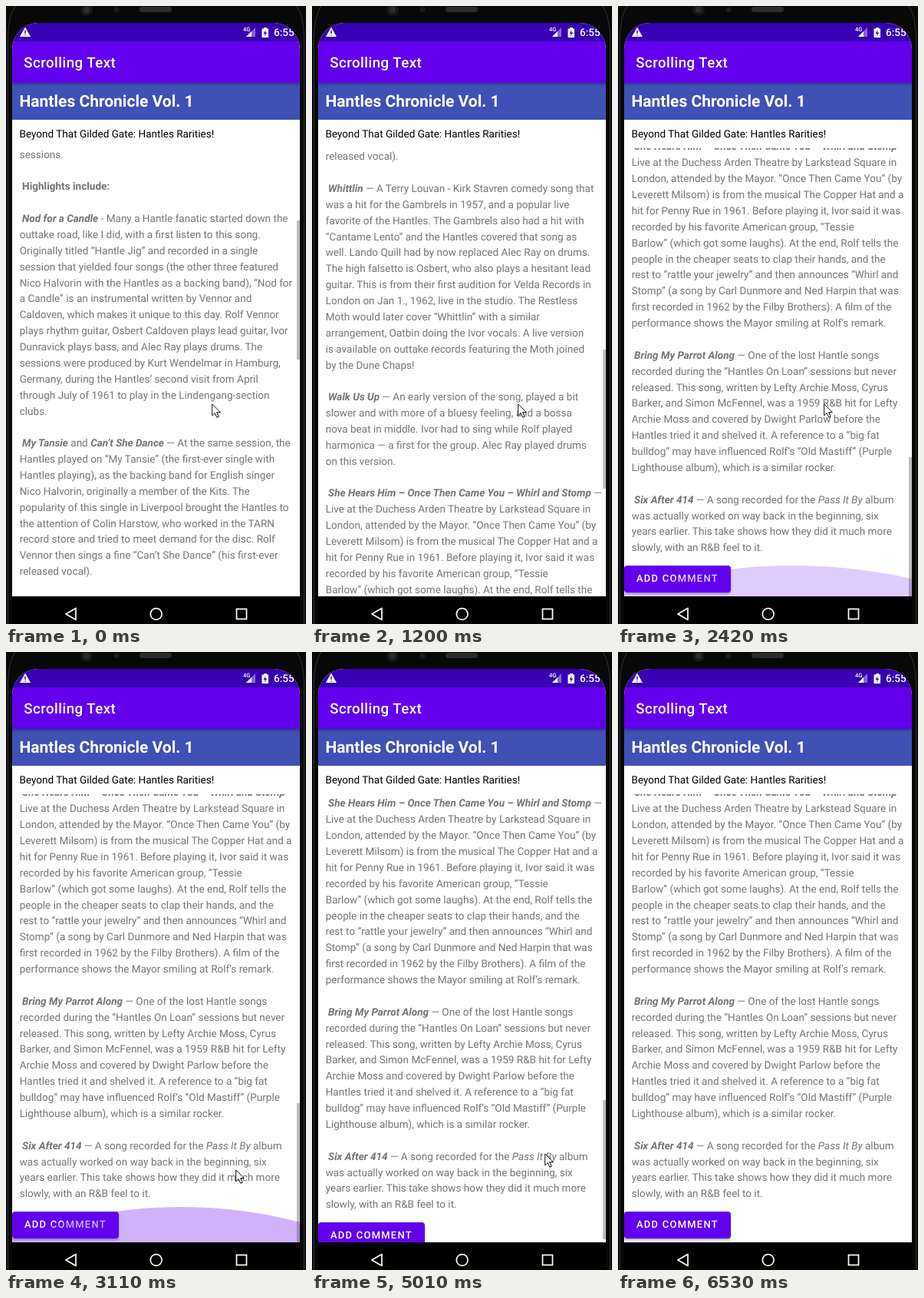
These frames come from a looping animation (391x804 px, 7090 ms). An HTML page:

```html
<!DOCTYPE html>
<html lang="en">
<head>
<meta charset="utf-8">
<title>Scrolling Text</title>
<style>
html, body { margin: 0; width: 100%; height: 100%; overflow: hidden; background: #080808; }
#stage { position: relative; width: 391px; height: 804px; overflow: hidden; background: #080808;
  font: 13.55px Roboto, "Liberation Sans", sans-serif; text-rendering: geometricPrecision; }
#stage div, #stage svg { position: absolute; }
#screen { left: 8px; top: 22px; width: 375px; height: 782px; border-radius: 34px 34px 0 0; overflow: hidden; background: #fff; }
#status { width: 375px; height: 24px; background: #3700b3; }
#bar { top: 24px; width: 375px; height: 54px; background: #6200ee; box-shadow: 0 2px 4px #0005; z-index: 1; }
#bar div { left: 15.3px; top: 15px; font-size: 18.7px; line-height: 26px; font-weight: 500; letter-spacing: .45px; color: #fff; white-space: pre; }
#head { top: 78px; width: 375px; height: 47.5px; background: #3f51b5; }
#head div { left: 9.5px; top: 12px; font-size: 21px; line-height: 26px; font-weight: 700; color: #fff; white-space: pre; }
#sub { left: 9.5px; top: 135px; line-height: 21px; color: #000; white-space: pre; }
#view { top: 163px; width: 375px; height: 583px; overflow: hidden; background: #fff; }
#page { left: 0; top: 0; width: 375px; }
#page .line { left: 9.7px; height: 20.87px; line-height: 20.87px; color: #757575; white-space: pre; }
#add { left: 0; top: 1534px; width: 139px; height: 35px; border-radius: 4px; background: #6200ee; color: #fff;
  font-size: 13px; font-weight: 500; line-height: 35px; letter-spacing: 1.22px; text-indent: 16px; white-space: pre; box-shadow: 0 2px 3px #0005; }
#thumb { left: 371px; top: 0; width: 4px; height: 181px; background: #bdbdbd; }
#nav { top: 746px; width: 375px; height: 36px; background: #000; }
#icons { left: -8px; top: -22px; z-index: 2; }
</style>
</head>
<body>
<div id="stage">
  <svg width="391" height="804">
    <path d="M2.5 804V40Q3 14 12 0M388.5 804V40Q388 14 379 0" fill="none" stroke="#333"/>
    <circle cx="105" cy="5" r="8" fill="#171717"/><circle cx="105" cy="5" r="4" fill="#2c2c2e"/>
    <circle cx="144" cy="5" r="3.5" fill="#1c1c1c"/>
    <rect x="174" y="1" width="42" height="7" rx="3.5" fill="#2b2b2b"/>
  </svg>
  <div id="screen">
    <div id="status"></div>
    <div id="bar"><div>Scrolling Text</div></div>
    <div id="head"><div>Hantles Chronicle Vol. 1</div></div>
    <div id="sub">Beyond That Gilded Gate: Hantles Rarities!</div>
    <div id="view">
      <div id="page"></div>
      <div id="thumb"></div>
      <svg width="375" height="583"><ellipse id="glow" cx="220" rx="450" fill="#6200ee"/></svg>
    </div>
    <div id="nav"></div>
    <svg id="icons" width="391" height="804" fill="#fff" font-weight="500">
      <path d="M25 27.5L32 40H18Z"/>
      <path d="M25 31.5V36M25 37.2V38.6" stroke="#3700b3" stroke-width="1.4"/>
      <text x="309" y="33" font-size="7.5">4G</text>
      <path d="M325 28V40H313Z" opacity=".4"/><path d="M320 33V40H313Z"/>
      <path d="M333.5 29.5H336V28H340V29.5H342V41H333.5Z"/>
      <path d="M338.6 31L335.5 36H337.6L337 39.5L340.2 34.4H338Z" fill="#3700b3"/>
      <text x="349" y="39" font-size="13.6">6:55</text>
      <g fill="none" stroke="#fff" stroke-width="1.7">
        <path d="M78 791L91 783.5V798.5Z" stroke-linejoin="round"/>
        <circle cx="195.7" cy="791" r="7.4"/><rect x="300.5" y="784.5" width="13" height="13"/>
      </g>
    </svg>
  </div>
  <svg id="mouse" width="16" height="22" style="left:0;top:0">
    <path d="M.7 .9V15.8L4.2 12.5L6.8 18.3L9.2 17.2L6.6 11.6H11.3Z" fill="#fff" stroke="#111" stroke-width="1"/>
  </svg>
</div>
<script>
// *bold italic*  _italic_  #bold#
const text = `sessions.

 #Highlights include:#

 *Nod for a Candle* - Many a Hantle fanatic started down the
outtake road, like I did, with a first listen to this song.
Originally titled “Hantle Jig” and recorded in a single
session that yielded four songs (the other three featured
Nico Halvorin with the Hantles as a backing band), “Nod for
a Candle” is an instrumental written by Vennor and
Caldoven, which makes it unique to this day. Rolf Vennor
plays rhythm guitar, Osbert Caldoven plays lead guitar, Ivor
Dunravick plays bass, and Alec Frame plays drums. The
sessions were produced by Kurt Wendelmar in Hamburg,
Germany, during the Hantles’ second visit from April
through July of 1961 to play in the Lindengang-section
clubs.

 *My Tansie* and *Can’t She Dance* — At the same session, the
Hantles played on “My Tansie” (the first-ever single with
Hantles playing), as the backing band for English singer
Nico Halvorin, originally a member of the Kits. The
popularity of this single in Liverpool brought the Hantles to
the attention of Colin Harstow, who worked in the TARN
record store and tried to meet demand for the disc. Rolf
Vennor then sings a fine “Can’t She Dance” (his first-ever
released vocal).

 *Whittlin* — A Terry Louvan - Kirk Stavren comedy song that
was a hit for the Gambrels in 1957, and a popular live
favorite of the Hantles. The Gambrels also had a hit with
“Cantame Lento” and the Hantles covered that song as
well. Lando Quill had by now replaced Alec Ray on drums.
The high falsetto is Osbert, who also plays a hesitant lead
guitar. This is from their first audition for Velda Records in
London on Jan 1., 1962, live in the studio. The Restless
Moth would later cover “Whittlin” with a similar
arrangement, Oatbin doing the Ivor vocals. A live version
is available on outtake records featuring the Moth joined
by the Dune Chaps!

 *Walk Us Up* — An early version of the song, played a bit
slower and with more of a bluesy feeling, and a bossa
nova beat in middle. Ivor had to sing while Rolf played
harmonica — a first for the group. Alec Ray played drums
on this version.

 *She Hears Him – Once Then Came You – Whirl and Stomp* —
Live at the Duchess Arden Theatre by Larkstead Square in
London, attended by the Mayor. “Once Then Came You” (by
Leverett Milsom) is from the musical The Copper Hat and a
hit for Penny Rue in 1961. Before playing it, Ivor said it was
recorded by his favorite American group, “Tessie
Barlow” (which got some laughs). At the end, Rolf tells the
people in the cheaper seats to clap their hands, and the
rest to “rattle your jewelry” and then announces “Whirl and
Stomp” (a song by Carl Dunmore and Ned Harpin that was
first recorded in 1962 by the Filby Brothers). A film of the
performance shows the Mayor smiling at Rolf’s remark.

 *Bring My Parrot Along* — One of the lost Hantle songs
recorded during the “Hantles On Loan” sessions but never
released. This song, written by Lefty Archie Moss, Cyrus
Barker, and Simon McFennel, was a 1959 R&B hit for Lefty
Archie Moss and covered by Dwight Parlow before the
Hantles tried it and shelved it. A reference to a “big fat
bulldog” may have influenced Rolf’s “Old Mastiff” (Purple
Lighthouse album), which is a similar rocker.

 *Six After 414* — A song recorded for the _Pass It By_ album
was actually worked on way back in the beginning, six
years earlier. This take shows how they did it much more
slowly, with an R&B feel to it.`.replace('Alec Frame', 'Alec Ray');

const LOOP = 7090, PITCH = 20.87, VIEW = 583;
const $ = id => document.getElementById(id);
const markup = s => s.replace(/&/g, '&amp;')
  .replace(/\*(.+?)\*/g, '<b><i>$1</i></b>')
  .replace(/_(.+?)_/g, '<i>$1</i>')
  .replace(/#(.+?)#/g, '<b>$1</b>');

$('page').innerHTML = text.split('\n').map((s, i) =>
  `<div class="line" style="top:${(i * PITCH - 1.4).toFixed(2)}px">${markup(s)}</div>`).join('') +
  '<div id="add">ADD COMMENT</div>';

// each row: time, then values held until the next row
const scroll = [[0, 0], [120, 42], [260, 44], [660, 150], [780, 298], [930, 420], [1050, 490],
  [1200, 540], [1320, 566], [1470, 578], [1870, 725], [1990, 889], [2140, 965], [2290, 988],
  [2420, 991], [5010, 977], [5130, 958], [5540, 964], [5660, 970], [5800, 991]];
const glow = [[0, 0, 0], [2420, 40, .2], [2560, 56, .3], [2680, 64, .3], [2840, 65, .3],
  [2970, 58, .3], [3110, 46, .3], [3230, 30, .2], [3380, 12, .1], [3530, 0, 0]];
const mouse = [[0, 268, 517], [3110, 299, 673], [3230, 312, 753], [3380, 314, 771], [3530, 318, 771],
  [3690, 317, 771], [3840, 316, 770], [4110, 312, 722], [4230, 303, 652], [6380, 345, 788], [6530, 400, 820]];
const thumb = [[0, 1], [3380, .5], [3530, 0], [5010, 1], [6380, .5], [6530, 0]];

const at = (rows, t) => rows.findLast(r => r[0] <= t).slice(1);
const move = (id, x, y) => $(id).style.transform = `translate(${x}px,${y}px)`;

function draw(t) {
  const [s] = at(scroll, t), [h, a] = at(glow, t), [x, y] = at(mouse, t);
  move('page', 0, -s);
  move('thumb', 0, Math.round(94 + s * .311));
  $('thumb').style.opacity = at(thumb, t)[0];
  const ry = 450 * h / 64;
  $('glow').setAttribute('ry', ry);
  $('glow').setAttribute('cy', VIEW - h + ry);
  $('glow').setAttribute('fill-opacity', a);
  move('mouse', x, y);
}

const start = performance.now();
function tick() {
  draw((performance.now() - start) % LOOP);
  requestAnimationFrame(tick);
}
tick();
</script>
</body>
</html>
```
